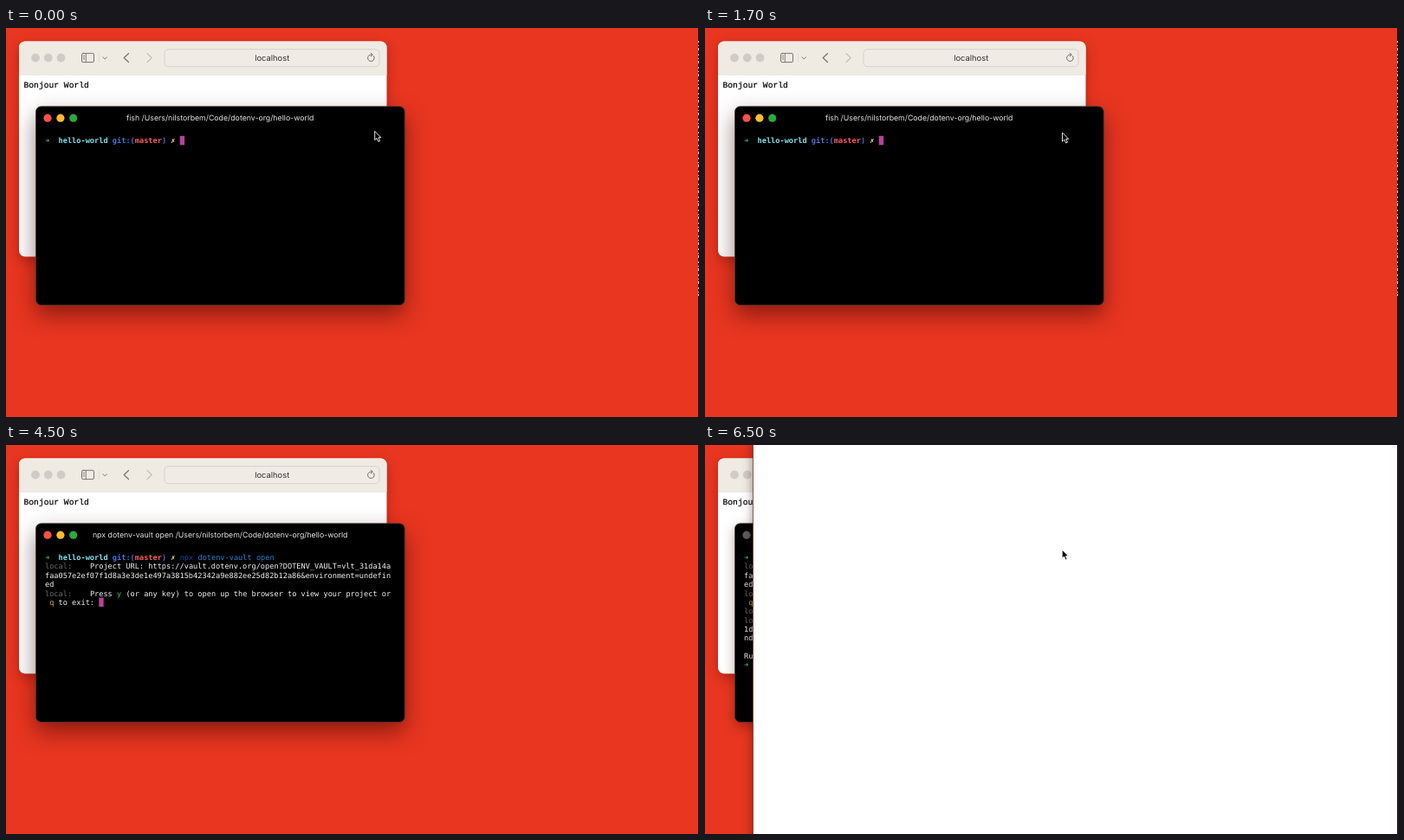
Recreate the animation shown at these times as an HTML page. Size 800 by 450 pixels, loop 8 s.

```html
<!DOCTYPE html>
<html lang="en">
<head>
<meta charset="utf-8">
<title>Terminal session</title>
<style>
html, body { margin: 0; width: 100%; height: 100%; overflow: hidden; background: #e83620; }
svg { display: block; width: 800px; height: 450px; }
text { white-space: pre; text-rendering: geometricPrecision; }
.mono { font: 8.62px "DejaVu Sans Mono", monospace; }
.mono.bold { font-weight: 700; }
.page { font: 9.67px "Liberation Mono", "Courier New", monospace; stroke: #000; stroke-width: .2px; }
.ui { font-family: Inter, sans-serif; text-anchor: middle; }
.line { fill: none; stroke-linecap: round; stroke-linejoin: round; }
#browser { filter: drop-shadow(0 5px 7px rgba(60, 0, 0, .3)); }
#shell { filter: drop-shadow(0 11px 13px rgba(50, 0, 0, .5)); }
#shell.idle { filter: drop-shadow(0 5px 7px rgba(60, 0, 0, .35)); }
#sheet { filter: drop-shadow(0 2px 6px rgba(40, 0, 0, .5)); }
</style>
</head>
<body>
<svg viewBox="0 0 800 450">
  <rect width="800" height="450" fill="#e83620"/>

  <g id="browser">
    <rect x="15" y="15.5" width="424.5" height="249" rx="7" fill="#fff"/>
    <path d="M15 54V22.5a7 7 0 0 1 7-7h410.500a7 7 0 0 1 7 7V54z" fill="#efebe3"/>
  </g>
  <path d="M15 54.200H439.500" stroke="#dedad3" stroke-width=".7"/>
  <g fill="#d0ccc5">
    <circle cx="34" cy="34.500" r="4.900"/>
    <circle cx="48.800" cy="34.500" r="4.900"/>
    <circle cx="63.500" cy="34.500" r="4.900"/>
  </g>
  <g class="line" stroke="#77736e">
    <rect x="87.500" y="29.300" width="14" height="10.300" rx="1.600"/>
    <path d="M92.300 29.500V39.500M89.300 32h1.300M89.300 34h1.300M89.300 36h1.300" stroke-width=".9"/>
    <path d="M112 33.700l2.200 2.200 2.200-2.200"/>
    <path d="M141.500 29.500l-5.300 5 5.300 5" stroke-width="1.200"/>
    <path d="M163 29.500l5.300 5-5.300 5" stroke="#c4c0ba" stroke-width="1.200"/>
    <path d="M107.500 29.500v10" stroke="#ddd9d2" stroke-width=".7"/>
  </g>
  <rect x="183" y="24.700" width="248" height="20" rx="4.500" fill="#f0ece5" stroke="#d5d1ca"/>
  <g class="line" stroke="#6c6965">
    <path d="M424.600 32.600a3.800 3.800 0 1 1-3.100-1.700h1.300M421.300 29l1.800 1.900-1.800 1.900"/>
  </g>
  <text class="ui" x="307.200" y="38.200" font-size="9.400" fill="#33312f">localhost</text>
  <text class="page" x="20.500" y="69">Bonjour World</text>

  <g id="shell">
    <rect x="34.500" y="90.800" width="425.700" height="229.700" rx="6" fill="#000" stroke="#42372f" stroke-width=".8"/>
  </g>
  <g>
    <circle class="light" cx="48" cy="104.200" r="4.600"/>
    <circle class="light" cx="62.900" cy="104.200" r="4.600"/>
    <circle class="light" cx="77.700" cy="104.200" r="4.600"/>
  </g>
  <text class="ui" id="title" x="247.200" y="107.200" font-size="8.780" fill="#e4e4e4"></text>
  <g id="rows"></g>

  <g id="sheet"><rect x="55.500" y="-10" width="760" height="470" fill="#fff"/></g>
  <path id="sheetEdge" d="M55.500 0V450" stroke="#6b3a34" stroke-width=".8"/>

  <path d="M799.500 0V450" stroke="#240804"/>
  <path id="specks" d="M799.500 15V310" stroke="#e9c9c4" stroke-dasharray="2 3 1 2 3 4"/>

  <path id="mouse" d="M0 0V10.200L2.300 8.100 4.100 12 5.900 11.200 4.200 7.400H7.300Z"
        fill="#000" stroke="#fff" stroke-width=".9" stroke-linejoin="round"/>
</svg>
<script>
const LOOP = 8000;
const LEFT = 45, COL = 5.19, TOP = 133.1, ROW = 10.36;
const WHITE = '#f4f4f4', GRAY = '#6a6a6a', GREEN = '#3ccb46', YELLOW = '#d6b42c';
const BLUE = '#4a74d8', NAVY = '#1e4795', SKY = '#2f83d0', PINK = '#b5439b';
const PATH = '/Users/nilstorbem/Code/dotenv-org/hello-world';

// A run is [row, column, text, colour, bold].
const prompt = [
  [0, 0, '➜', GREEN, 1], [0, 3, 'hello-world', '#82e6f2', 1],
  [0, 15, 'git:(', BLUE, 1], [0, 20, 'master', '#ff5c5c', 1],
  [0, 26, ')', BLUE, 1], [0, 28, '✗', '#f5ee92', 1]
];
const command = [[0, 30, 'npx', NAVY], [0, 34, 'dotenv-vault', SKY]];
const partial = [...prompt, ...command, [0, 47, 'op', SKY], [0, 49, 'e', '#5c2f6b'], [0, 50, 'n', NAVY]];
const output = [
  ...prompt, ...command, [0, 47, 'open', SKY],
  [1, 0, 'local:', GRAY],
  [1, 10, 'Project URL: https://vault.dotenv.org/open?DOTENV_VAULT=vlt_31da14a', WHITE],
  [2, 0, 'faa057e2ef07f1d8a3e3de1e497a3815b42342a9e882ee25d82b12a86&environment=undefin', WHITE],
  [3, 0, 'ed', WHITE],
  [4, 0, 'local:', GRAY], [4, 10, 'Press', WHITE], [4, 16, 'y', GREEN],
  [4, 18, '(or any key) to open up the browser to view your project or', WHITE],
  [5, 1, 'q', YELLOW], [5, 3, 'to exit:', WHITE]
];
const finished = [
  ...output, [6, 0, 'local:', GRAY], [7, 0, 'local:', GRAY],
  [8, 0, '1d', WHITE], [9, 0, 'nd', WHITE], [11, 0, 'Run', WHITE], [12, 0, '➜', GREEN, 1]
];

const shellTitle = 'fish ' + PATH, openTitle = 'npx dotenv-vault open ' + PATH;
const steps = [
  { at: 0, title: shellTitle, runs: prompt, caret: [0, 30], mouse: [425.7, 119.4], specks: true },
  { at: 500, title: shellTitle, runs: prompt, caret: [0, 30], mouse: [412.5, 121], specks: true },
  { at: 2500, title: shellTitle, runs: partial, caret: [0, 49], specks: true },
  { at: 4500, title: openTitle, runs: output, caret: [5, 12] },
  { at: 6500, title: openTitle, runs: finished, mouse: [412.2, 121], covered: true }
];

const $ = id => document.getElementById(id);
const show = (id, on) => { $(id).style.display = on ? '' : 'none'; };

function add(tag, attrs, text = '') {
  const el = document.createElementNS('http://www.w3.org/2000/svg', tag);
  for (const key in attrs) el.setAttribute(key, attrs[key]);
  el.textContent = text;
  $('rows').append(el);
}

function draw(step) {
  $('title').textContent = step.title;
  $('rows').textContent = '';
  if (step.caret) {
    const [row, col] = step.caret;
    add('rect', { x: LEFT + col * COL, y: TOP + row * ROW - 8.3, width: 5.4, height: 10.6, fill: PINK });
  }
  for (const [row, col, text, fill, bold] of step.runs) {
    add('text', { x: LEFT + col * COL, y: TOP + row * ROW, fill, class: bold ? 'mono bold' : 'mono' }, text);
  }
  const lights = step.covered ? ['#5c5c5c', '#5c5c5c', '#5c5c5c'] : ['#fb5149', '#fdbc2f', '#2bab3c'];
  document.querySelectorAll('.light').forEach((el, i) => el.setAttribute('fill', lights[i]));
  $('shell').classList.toggle('idle', !!step.covered);
  show('sheet', step.covered);
  show('sheetEdge', step.covered);
  show('specks', step.specks);
  show('mouse', step.mouse);
  if (step.mouse) $('mouse').setAttribute('transform', `translate(${step.mouse})`);
}

let current;
const start = performance.now();
function tick() {
  const t = (performance.now() - start) % LOOP;
  const step = steps.findLast(s => s.at <= t);
  if (step !== current) draw(current = step);
  requestAnimationFrame(tick);
}
tick();
</script>
</body>
</html>
```
